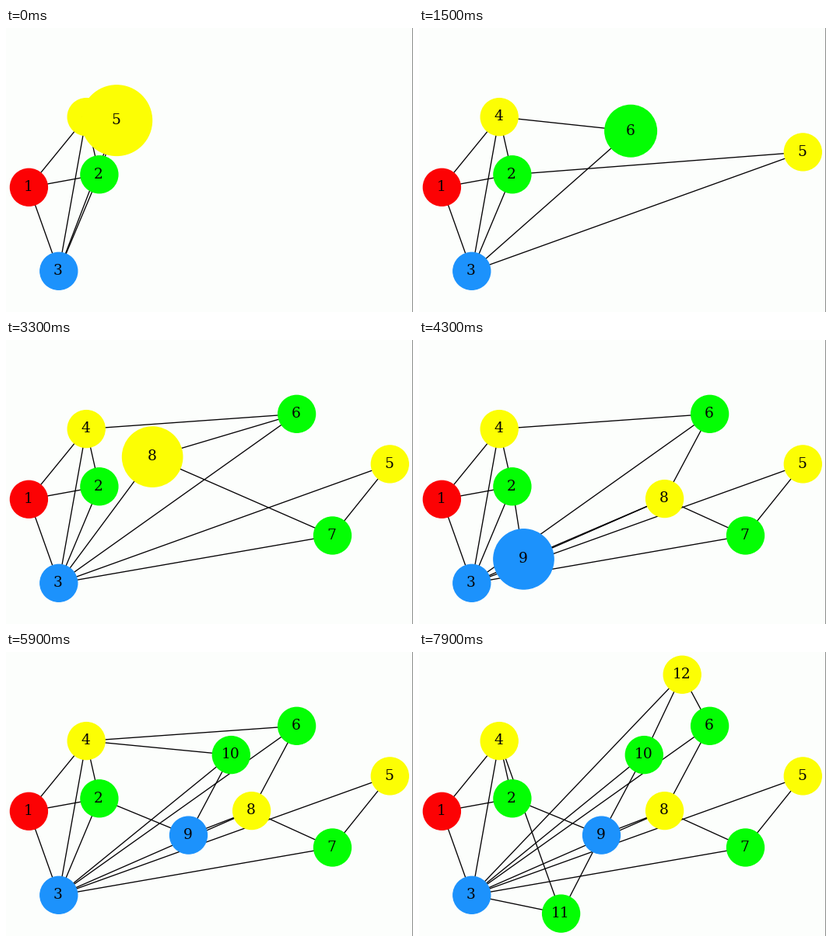
Animation of 523x366 px, one loop 8 s. Source, as a matplotlib script:

```python
from itertools import pairwise

import matplotlib.pyplot as plt
from matplotlib.animation import FuncAnimation
from matplotlib.collections import LineCollection
from matplotlib.patches import Circle

W, H, DPI = 523, 366, 64
PX = 72 / DPI              # points per pixel
UNIT = 4 / 3               # pixels per layout unit
STEPS = 10                 # frames for each new node

PAPER, INK, BORDER = "#fcfefc", "#040204", "#8c8e8c"
RED, GREEN, BLUE, YELLOW = "#fc0204", "#04fe04", "#1c92fc", "#fcfe04"

# The four nodes every other one unfolds from: color and position.
SEEDS = [(RED, 29.4, 205.3), (GREEN, 119.9, 188.8),
         (BLUE, 67.8, 313.3), (YELLOW, 103.2, 114.6)]

# Later nodes in order of appearance: parent and resting position.
UNFOLDED = [(4, 493.3, 159.9), (2, 373.6, 95.3), (2, 419.5, 252.0),
            (4, 315.6, 204.6), (3, 234.5, 236.1), (2, 289.3, 132.6),
            (2, 182.6, 337.1), (4, 338.2, 29.2)]

color, home, parent = {}, {}, {}
for n, (c, x, y) in enumerate(SEEDS, 1):
    color[n], home[n], parent[n] = c, (x, y), n
for n, (p, x, y) in enumerate(UNFOLDED, len(SEEDS) + 1):
    color[n], home[n], parent[n] = color[p], (x, y), p

# Final graph: one trail, a chord, and a hub tied to nearly all the rest.
HUB = 3
TRAIL = [5, 7, 8, 6, 12, 10, 9, 11, 4, 1, 2, 9, 8]
EDGES = [*pairwise(TRAIL), (2, 4), *((HUB, n) for n in home if n not in (2, HUB, 9))]


def folded_edges(newest):
    """Edges left when nodes still to come are merged into their parents."""
    def fold(n):
        return n if n <= newest else parent[n]
    return {tuple(sorted((fold(a), fold(b)))) for a, b in EDGES}


def radius(scale):
    return round(36 * scale) / 2 * UNIT


fig = plt.figure(figsize=(W / DPI, H / DPI), dpi=DPI, facecolor=PAPER)
ax = fig.add_axes([0, 0, 1, 1])
ax.set_xlim(0, W)
ax.set_ylim(H, 0)
ax.axis("off")

ax.axvspan(W - 1, W, color=BORDER, lw=0, zorder=0)
lines = LineCollection([], colors=INK, linewidths=UNIT * PX, zorder=1)
ax.add_collection(lines, autolim=False)

discs, labels = {}, {}
for n, xy in home.items():
    discs[n] = ax.add_patch(Circle(xy, radius(1), fc=color[n], ec=color[n],
                                   lw=UNIT * PX, zorder=n + 1))
    labels[n] = ax.text(*xy, str(n), family="DejaVu Serif",
                        fontsize=14 * UNIT * PX, color=INK,
                        ha="center", va="baseline", zorder=n + 1.5)


def draw(frame):
    stage, step = divmod(frame, STEPS)
    newest = len(SEEDS) + 1 + stage
    t = (step + 1) / STEPS

    # The new node glides out of its parent, shrinking from double size.
    pos = dict(home)
    pos[newest] = tuple(a + (b - a) * t
                        for a, b in zip(home[parent[newest]], home[newest]))

    for n, (x, y) in pos.items():
        discs[n].set_visible(n <= newest)
        labels[n].set_visible(n <= newest)
        discs[n].center = x, y
        discs[n].set_radius(radius(2 - t if n == newest else 1))
        labels[n].set_position((x - 0.8, y + 4.8))

    lines.set_segments([(pos[a], pos[b]) for a, b in folded_edges(newest)])
    return [lines, *discs.values(), *labels.values()]


anim = FuncAnimation(fig, draw, frames=len(UNFOLDED) * STEPS,
                     interval=100, repeat=True, repeat_delay=0, blit=False)
plt.show()
```
